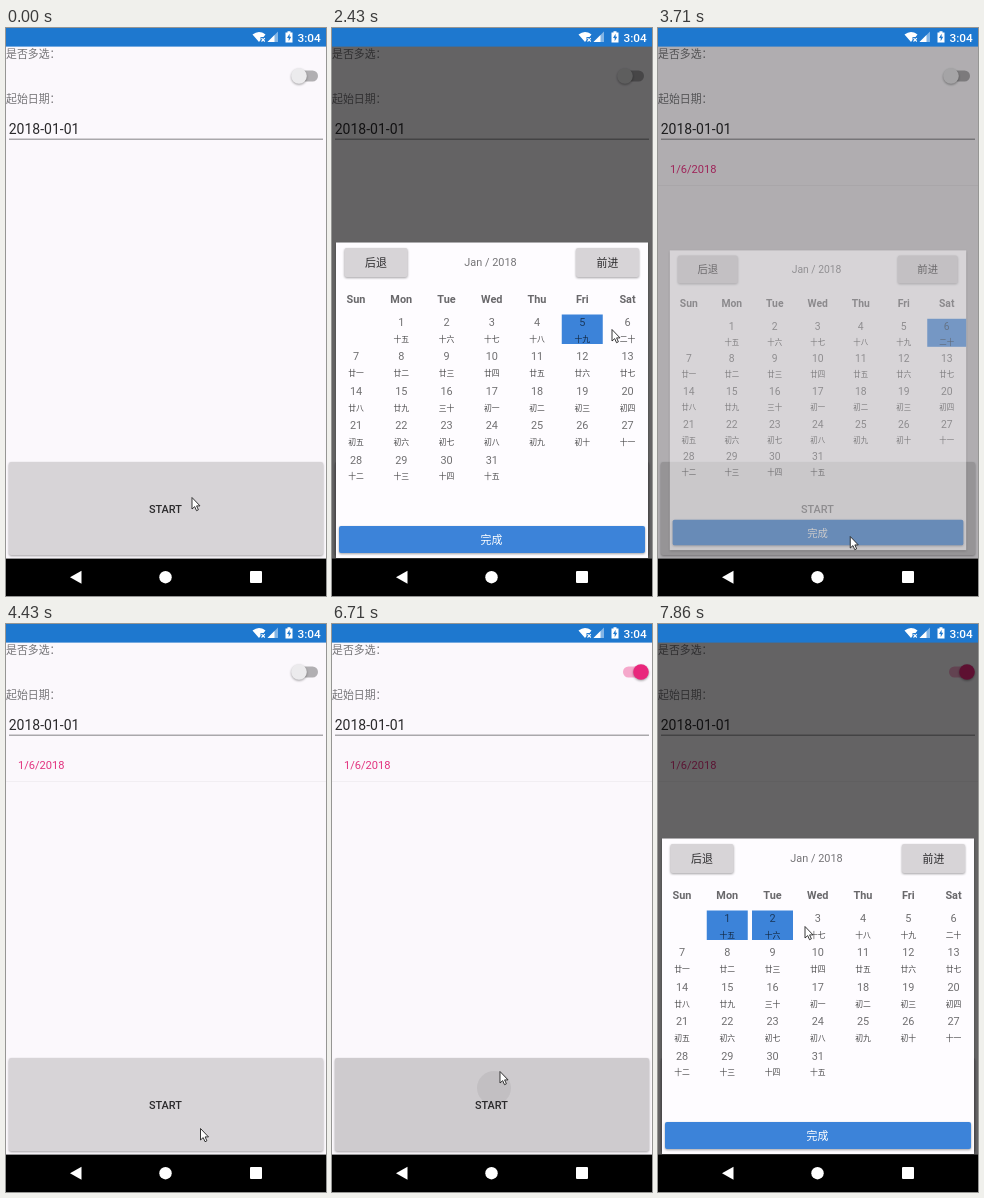
An HTML page that plays this animation: 320x568 px, repeating every 8000 ms.

```html
<!DOCTYPE html>
<html lang="zh">
<head>
<meta charset="utf-8">
<title>Calendar picker</title>
<style>
html, body { margin: 0; width: 100%; height: 100%; overflow: hidden; background: #fbf8fc; }
svg { display: block; width: 100vw; height: 100vh; }
text { font-family: Roboto, "Noto Sans CJK SC", "Noto Sans CJK", sans-serif; font-size: 10.9px; fill: #757477; }
.mid { text-anchor: middle; }
.strong { font-weight: 500; fill: #2b2a2c; }
.head { font-weight: 700; fill: #69686b; }
.day { fill: rgba(0, 0, 0, .56); }
.lunar { font-size: 7.8px; fill: rgba(0, 0, 0, .72); }
.raised { filter: drop-shadow(0 1px 1px rgba(0, 0, 0, .36)); }
</style>
</head>
<body>
<svg id="stage" viewBox="0 0 320 568" preserveAspectRatio="none">
  <defs><clipPath id="startClip"><rect x="3" y="434" width="314" height="93" rx="2"/></clipPath></defs>

  <g id="form">
    <rect width="320" height="568" fill="#fbf8fc"/>
    <text x="0" y="30.4">是否多选：</text>
    <rect id="track" x="289" y="42.5" width="23" height="11" rx="5.5"/>
    <circle id="thumb" class="raised" cy="48" r="7.8"/>
    <text x="0" y="75.4">起始日期：</text>
    <text x="2.7" y="105.5" style="font-size:14px;fill:#2b2a2c">2018-01-01</text>
    <rect x="3" y="110.7" width="314" height=".9" fill="#757477"/>
    <g id="result">
      <text x="12" y="145" style="font-size:11.1px;fill:#e2347f">1/6/2018</text>
      <rect y="157" width="320" height="1" fill="#f1eef2"/>
    </g>
    <rect id="start" class="raised" x="3" y="434" width="314" height="93" rx="2"/>
    <circle id="ripple" fill="#000" fill-opacity=".06" clip-path="url(#startClip)"/>
    <text class="mid strong" x="159.5" y="484.5">START</text>
  </g>

  <rect id="dim" y="18" width="320" height="513" fill="#000"/>

  <g id="dialog">
    <rect class="raised" x="4" y="214.5" width="312" height="315.5" fill="#fefcff"/>
    <g id="grid"></g>
    <rect class="raised" x="12.5" y="220" width="63" height="29" rx="2" fill="#d7d4d7"/>
    <rect class="raised" x="244" y="220" width="63" height="29" rx="2" fill="#d7d4d7"/>
    <text class="mid strong" x="44" y="238.5">后退</text>
    <text class="mid strong" x="275.5" y="238.5">前进</text>
    <text class="mid" x="158.5" y="238">Jan / 2018</text>
    <rect class="raised" x="7" y="498" width="306" height="27" rx="2" fill="#3c83d9"/>
    <text class="mid" x="159.5" y="516" style="fill:#fff;font-weight:500">完成</text>
  </g>

  <g id="bars">
    <rect width="320" height="18.6" fill="#1e78cf"/>
    <g fill="#fff">
      <path d="M246.5 6.5Q253 1.5 259.5 6.5L257.5 9H254.5V12L253 14Z"/>
      <path d="M255.5 10.2L258.8 13.5M258.8 10.2L255.5 13.5" stroke="#fff" stroke-width="1.1"/>
      <path d="M261.5 14L272 3.5V14Z" opacity=".45"/>
      <path d="M261.5 14L268.5 7V14Z"/>
      <path d="M279.5 4.5H281.5V3.3H284.5V4.5H286.5V14.5H279.5Z"/>
      <path d="M283.6 5.8L281 10H282.7V13.2L285.2 8.8H283.6Z" fill="#1e78cf"/>
    </g>
    <text x="291.5" y="13.5" style="font-size:11.8px;font-weight:500;fill:#fff">3:04</text>
    <rect y="530.6" width="320" height="37.4"/>
    <path d="M64 549.3L75.5 542.8V555.8Z" fill="#fff"/>
    <circle cx="159.5" cy="549.2" r="6.2" fill="#fff"/>
    <rect x="244" y="543" width="12" height="12" rx="1" fill="#fff"/>
  </g>

  <path id="cursor" d="M0 .5V12L2.7 9.6L4.5 13.7L6.4 12.8L4.6 8.9H8Z"
    fill="#fff" stroke="#222" stroke-width=".9" stroke-linejoin="round"/>
</svg>

<script>
const LOOP = 8000, TICK = 1000 / 7;
const el = id => document.getElementById(id);

function add(tag, attrs, label) {
  const node = document.createElementNS("http://www.w3.org/2000/svg", tag);
  for (const key in attrs) node.setAttribute(key, attrs[key]);
  if (label !== undefined) node.textContent = label;
  return el("grid").appendChild(node);
}

function set(id, attrs) {
  for (const key in attrs) el(id).setAttribute(key, attrs[key]);
}

// Lunar day names run from 1 to 30.
function lunarName(n) {
  const units = "一二三四五六七八九十";
  if (n === 20) return "二十";
  if (n === 30) return "三十";
  return "初十廿"[Math.floor((n - 1) / 10)] + units[(n - 1) % 10];
}

const colX = col => 24 + col * 45.25;
const cells = [];

["Sun", "Mon", "Tue", "Wed", "Thu", "Fri", "Sat"].forEach((name, col) =>
  add("text", { class: "mid head", x: colX(col), y: 274.5 }, name));

for (let day = 1; day <= 31; day++) {
  const x = colX(day % 7), y = Math.floor(day / 7) * 34.4;
  cells[day] = add("rect", { x: x - 20.5, y: 286.5 + y, width: 41, height: 29.5, fill: "#3c83d9" });
  add("text", { class: "mid day", x, y: 298 + y }, day);
  add("text", { class: "mid lunar", x, y: 313.8 + y }, lunarName((day + 13) % 30 + 1));
}

// Times are in ticks, seven to the second.
const OPEN = 4, SWEEP = 12, LAST_PICK = 20, CLOSE = 25, SWITCH = 38, REOPEN = 47, ADD_PICK = 53;
const home = { x: 186, y: 469 };
const moves = [
  { from: OPEN, to: 6, x: 157, y: 468 },
  { from: 6, to: 10, x: 104, y: 308 },
  { from: SWEEP, to: 17, x: 280, y: 301 },
  { from: LAST_PICK, to: 24, x: 190, y: 512 },
  { from: CLOSE, to: 27, x: 194.5, y: 504 },
  { from: 31, to: 34, x: 15, y: 150 },
  { from: 34, to: SWITCH, x: 300, y: 48 },
  { from: 41, to: 45, x: 168, y: 447 },
  { from: 49, to: 55, x: 147, y: 302 }
];

const ramp = (tick, from, to) => Math.min(1, Math.max(0, (tick - from) / (to - from)));
const smooth = p => p * p * (3 - 2 * p);
const lerp = (a, b, p) => a + (b - a) * p;
const mix = (a, b, p) => `rgb(${a.map((v, i) => Math.round(lerp(v, b[i], p)))})`;

function pointerAt(tick) {
  return moves.reduce((pos, move) => {
    const p = smooth(ramp(tick, move.from, move.to));
    return { x: lerp(pos.x, move.x, p), y: lerp(pos.y, move.y, p) };
  }, home);
}

// One date follows the sweep; the second visit keeps a range.
function isPicked(day, tick) {
  if (tick >= REOPEN) return day === 1 || (day === 2 && tick >= ADD_PICK);
  const swept = 1 + Math.floor(4 * ramp(tick, SWEEP, 17));
  return day === (tick < LAST_PICK ? swept : 6);
}

function draw(time) {
  const tick = Math.floor((time + 5) / TICK);
  const shown = ramp(tick, OPEN, OPEN + 2) - ramp(tick, CLOSE, CLOSE + 2) + ramp(tick, REOPEN, REOPEN + 2);
  const on = ramp(tick, SWITCH, SWITCH + 2);
  const { x, y } = pointerAt(tick);
  const tap = [OPEN, REOPEN].find(start => tick === start || tick === start + 1);
  const pressed = tap !== undefined;

  set("cursor", { transform: `translate(${x} ${y})` });
  set("dim", { opacity: shown * .6 });
  set("dialog", {
    opacity: shown,
    transform: `translate(160 372) scale(${lerp(.9, 1, shown)}) translate(-160 -372)`
  });
  set("thumb", { cx: lerp(293, 309, on), fill: mix([236, 235, 237], [233, 39, 124], on) });
  set("track", { x: lerp(289, 291, on), fill: mix([177, 175, 178], [245, 168, 203], on) });
  set("result", { opacity: tick > CLOSE ? 1 : 0 });
  set("start", { fill: pressed ? "#cecbce" : "#d7d4d7" });
  set("ripple", { cx: (x + 156) / 2, cy: (y + 481) / 2, r: pressed ? 17 + 38 * (tick - tap) : 0 });
  cells.forEach((cell, day) => cell.setAttribute("opacity", isPicked(day, tick) ? 1 : 0));
}

const begin = performance.now();
function loop() {
  draw((performance.now() - begin) % LOOP);
  requestAnimationFrame(loop);
}
loop();
</script>
</body>
</html>
```
